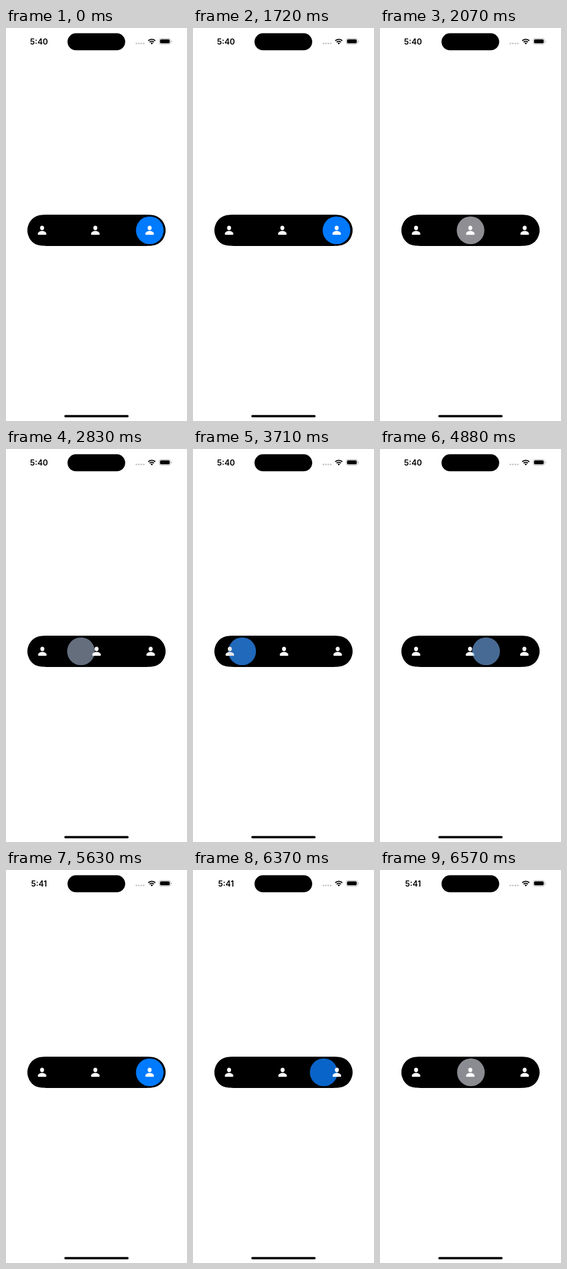
An HTML page that plays this animation: 296x640 px, repeating every 6.63 s.

```html
<!DOCTYPE html>
<html lang="en">
<head>
<meta charset="utf-8">
<title>Tab switcher</title>
<style>
  html, body { margin: 0; width: 100%; height: 100%; overflow: hidden; background: #fff; }
  svg { display: block; width: 100%; height: 100%; }
  text { font: 600 13px Inter, Roboto, sans-serif; text-anchor: middle; }
</style>
</head>
<body>
<svg viewBox="0 0 296 640">
  <defs>
    <g id="person" fill="#fff">
      <ellipse cy="-3.9" rx="3.25" ry="3.6"/>
      <path d="M-7 5.7C-7 3.5-4.4 .9 0 .9S7 3.5 7 5.7C7 6.8 6.4 7.2 5.3 7.2H-5.3C-6.4 7.2-7 6.8-7 5.7Z"/>
    </g>
  </defs>
  <rect width="296" height="640" fill="#fff"/>

  <text id="clock" x="54" y="26.6">5:40</text>
  <rect x="100.6" y="8.6" width="94.3" height="27.6" rx="13.8"/>
  <g fill="#c6c6c8">
    <circle cx="213.2" cy="25.2" r="1.35"/>
    <circle cx="217.2" cy="25.2" r="1.35"/>
    <circle cx="221.2" cy="25.2" r="1.35"/>
    <circle cx="225.2" cy="25.2" r="1.35"/>
  </g>
  <g fill="none" stroke="#000" stroke-width="1.9">
    <path d="M232.7 20.7a8.2 8.2 0 0 1 11.4 0"/>
    <path d="M234.9 23.1a5 5 0 0 1 7 0"/>
  </g>
  <path d="M238.4 26.7L236.5 24.8a2.7 2.7 0 0 1 3.8 0Z"/>
  <rect x="250.5" y="17.2" width="18.6" height="9.3" rx="3" fill="none" stroke="#a6a6a6" stroke-width=".8"/>
  <rect x="251.9" y="18.6" width="15.8" height="6.5" rx="1.8"/>
  <path d="M270 20.4a1.6 1.6 0 0 1 0 3Z" fill="#a6a6a6"/>

  <path id="pill"/>
  <g id="tabs"></g>
  <rect x="95.3" y="630.2" width="105.3" height="3.8" rx="1.9"/>
</svg>
<script>
const LOOP = 6630, EASE_TIME = 350, ROW_Y = 329.5;
const LEFT = 0, MID = 1, RIGHT = 2;
const colors = ['#007aff', '#8e8e93', '#007aff'];
const spotX = [60.7, 148.1, 235.1];
// Icon centres for each selected tab
const iconX = [[60.6, 149.2, 236.6], [59, 147.7, 236.6], [59, 146.1, 234.9]];
// The screen refreshes only at the listed times
const moves = [
  { from: RIGHT, to: MID, start: 1702, ticks: [1720, 1840, 1950, 2070] },
  { from: MID, to: LEFT, start: 2699, ticks: [2720, 2830, 2930, 3030] },
  { from: LEFT, to: MID, start: 3595, ticks: [3710, 3830, 3950] },
  { from: MID, to: RIGHT, start: 4749, ticks: [4770, 4880, 5000, 5110] },
  { from: RIGHT, to: MID, start: 6240, ticks: [6260, 6360, 6460, 6570] }
];

const byId = id => document.getElementById(id);
const mix = (a, b, p) => a + (b - a) * p;

function add(parent, tag, attrs) {
  const el = document.createElementNS('http://www.w3.org/2000/svg', tag);
  for (const k in attrs) el.setAttribute(k, attrs[k]);
  return parent.appendChild(el);
}

// Cubic ease-in-out with handles at .42 and .58
function ease(u) {
  if (u <= 0 || u >= 1) return u <= 0 ? 0 : 1;
  let lo = 0, hi = 1;
  for (let i = 0; i < 24; i++) {
    const s = (lo + hi) / 2, q = 1 - s;
    const x = 3 * s * q * (0.42 * q + 0.58 * s) + s * s * s;
    if (x < u) lo = s; else hi = s;
  }
  return lo * lo * (3 - 2 * lo);
}

// Capsule with smoothed corners, mirrored from one quarter
function pillPath(cx, cy, hw, r) {
  const at = (sx, sy) => ([x, y]) =>
    `${(cx + sx * (hw - x * r)).toFixed(2)} ${(cy + sy * (r - y * r)).toFixed(2)}`;
  const pts = [[1.528, 0], [1.088, 0], [.868, 0], [.631, .075], [.373, .169],
    [.169, .373], [.075, .631], [.02, .76], [0, .87], [0, 1]];
  const corner = (sx, sy, back) => {
    const [first, ...rest] = (back ? [...pts].reverse() : pts).map(at(sx, sy));
    return `${first}C${rest.join(' ')}`;
  };
  return `M${corner(1, -1)}L${corner(1, 1, true)}L${corner(-1, 1)}L${corner(-1, -1, true)}Z`;
}

byId('pill').setAttribute('d', pillPath(148, ROW_Y, 113, 25.5));
const tabs = colors.map(fill => ({
  spot: add(byId('tabs'), 'circle', { cy: ROW_Y, r: 22.6, fill }),
  icon: add(byId('tabs'), 'use', { href: '#person' })
}));

function stateAt(t) {
  let state = { from: RIGHT, to: RIGHT, p: 1 };
  for (const { from, to, start, ticks } of moves) {
    for (const tick of ticks) {
      if (t >= tick) state = { from, to, p: ease((tick - start) / EASE_TIME) };
    }
  }
  return state;
}

function draw(t) {
  const { from, to, p } = stateAt(t);
  const x = mix(spotX[from], spotX[to], p);
  tabs.forEach(({ spot, icon }, i) => {
    spot.setAttribute('cx', x);
    spot.setAttribute('opacity', mix(+(i === from), +(i === to), p));
    icon.setAttribute('transform', `translate(${mix(iconX[from][i], iconX[to][i], p)} ${ROW_Y})`);
  });
  byId('clock').textContent = t < 5630 ? '5:40' : '5:41';
}

let begin = null;
function frame(now) {
  if (begin === null) begin = now;
  draw((now - begin) % LOOP);
  requestAnimationFrame(frame);
}
draw(0);
requestAnimationFrame(frame);
</script>
</body>
</html>
```
